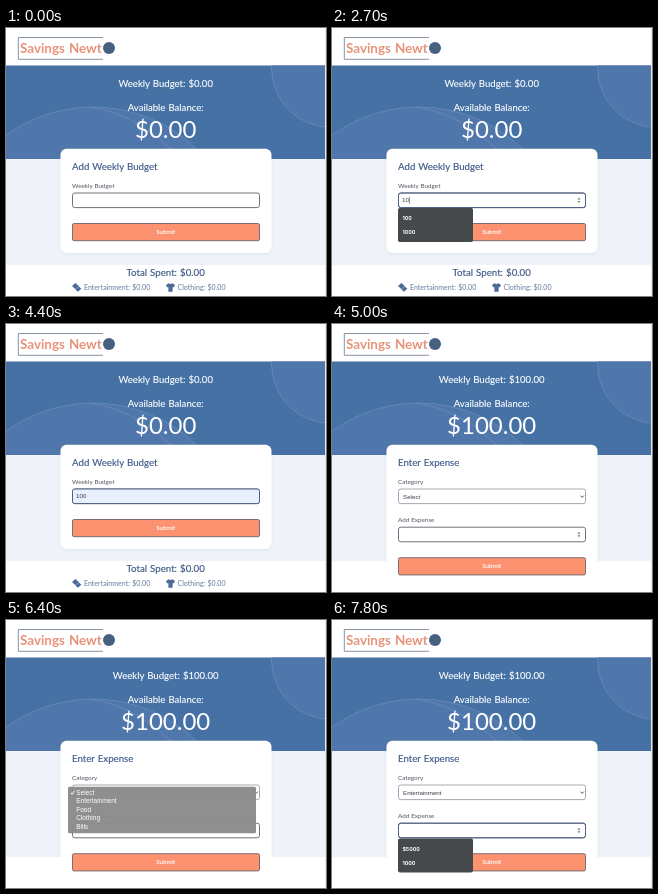
These frames come from a looping animation (320x268 px, 8000 ms). An HTML page:

```html
<!DOCTYPE html>
<html lang="en">
<head>
<meta charset="utf-8">
<title>Weekly budget demo</title>
<style>
  html, body { margin: 0; width: 100%; height: 100%; overflow: hidden; background: #fff; }
  svg { display: block; width: 100%; height: 100%; }
  text { font-family: Lato, "Open Sans", sans-serif; word-spacing: .06em; white-space: pre; }
  .mid { text-anchor: middle; }
  .brand { font-size: 13.4px; font-weight: 700; fill: #e8927a; }
  .line { font-size: 9.6px; fill: #fff; stroke: #fff; stroke-width: .12; }
  .balance { font-size: 24px; fill: #fff; }
  .heading { font-size: 9.7px; fill: #3d5988; stroke: #3d5988; stroke-width: .15; }
  .label { font-size: 6.3px; fill: #50555f; }
  .spent { font-size: 7.05px; fill: #637a9f; }
  .value { font: 6.2px "Liberation Sans", Arial, sans-serif; fill: #383c44; }
  .menu text { font: 6.5px "Liberation Sans", Arial, sans-serif; fill: #fff; }
  .list text { font: 700 5.3px Inter, sans-serif; fill: #fff; }
  .field { fill: #fff; stroke: #5f636c; stroke-width: .9; }
  .focus { fill: none; stroke: #4d6083; stroke-width: 1; }
  .caret { stroke: #666; stroke-width: .7; }
  .submit rect { fill: #fc9270; stroke: #6f6468; stroke-width: .9; }
  .submit text { font-size: 6.2px; fill: #fff; stroke: #fff; stroke-width: .1; }
</style>
</head>
<body>
<svg viewBox="0 0 320 268">
  <defs>
    <filter id="shadow" x="-10%" y="-10%" width="120%" height="120%">
      <feDropShadow dx="0" dy="1" stdDeviation="1.5" flood-color="#20406b" flood-opacity=".08"/>
    </filter>
    <clipPath id="banner"><rect y="37.5" width="320" height="93.5"/></clipPath>
    <rect id="box" x="66.5" y="165" width="187" height="14.6" rx="2.3"/>
    <path id="spinner" d="M245.4 171.5l1.5-2 1.5 2zM245.4 173l1.5 2 1.5-2z" fill="#737a86"/>
    <g id="submit" class="submit">
      <rect x="66.5" y="195.5" width="187" height="17.2" rx="1.6"/>
      <text class="mid" x="159.8" y="206.2">Submit</text>
    </g>
  </defs>

  <rect width="320" height="268" fill="#fff"/>
  <rect y="131" width="320" height="106" fill="#eff3f9"/>
  <g clip-path="url(#banner)">
    <rect y="37" width="320" height="94" fill="#4571a5"/>
    <g fill="#5077ab" stroke="#6c8fba" stroke-width=".7">
      <circle cx="87" cy="228" r="149"/>
      <circle cx="325" cy="40" r="59.5"/>
      <path d="M84 79Q134 86 174 131" fill="none"/>
    </g>
  </g>
  <rect x="319" width="1" height="268" fill="#e6e8ea"/>

  <path d="M97 9.5H12.3V31.3H97" fill="none" stroke="#76869a" stroke-width=".9"/>
  <text class="brand" x="14" y="25">Savings Newt</text>
  <circle cx="103" cy="20" r="6" fill="#46607f"/>

  <text class="line mid" x="159.7" y="58.7">Weekly Budget: <tspan class="amount"></tspan></text>
  <text class="line mid" x="159.7" y="82.6">Available Balance:</text>
  <text class="balance mid" x="159.7" y="109.6"><tspan class="amount"></tspan></text>

  <!-- Weekly budget form -->
  <g data-show="0-4500">
    <rect x="54.5" y="120.7" width="211" height="104.3" rx="6" fill="#fff" filter="url(#shadow)"/>
    <text class="heading" x="66" y="141.8">Add Weekly Budget</text>
    <text class="label" x="66" y="160.2">Weekly Budget</text>
    <use href="#box" class="field"/>
    <use href="#box" fill="#e8f0fe" data-show="3300-4500"/>
    <use href="#box" class="focus" data-show="1700-4500"/>
    <use href="#spinner" data-show="1700-3300"/>
    <text class="value" id="budget" x="70" y="174.4"></text>
    <path class="caret" id="caret" d="M0 168.7v7.2" data-show="1700-2200 2500-3300"/>
    <use href="#submit"/>
    <text class="heading mid" x="159.7" y="247.6">Total Spent: $0.00</text>
    <g fill="#4b6a96">
      <path d="M66 258l3.5-3 3.5 3.3-3.5 3z"/>
      <path d="M69.5 261.5l3.5-3 2.3 2.2-3.4 3z"/>
      <path d="M162.6 255.3q1.9 1.5 3.8 0l2.6 1.6-1.3 2.5-1.1-.5v4.9h-4.2v-4.9l-1.1.5-1.3-2.5z"/>
    </g>
    <text class="spent" x="78" y="262">Entertainment: $0.00</text>
    <text class="spent" x="171.5" y="262">Clothing: $0.00</text>
  </g>

  <!-- Expense form -->
  <g data-show="4500-8000">
    <rect x="54.5" y="120.7" width="211" height="143" rx="6" fill="#fff" filter="url(#shadow)"/>
    <rect x="50" y="237" width="220" height="31" fill="#fff"/>
    <text class="heading" x="66" y="141.8">Enter Expense</text>
    <text class="label" x="66" y="160.2">Category</text>
    <use href="#box" class="field" style="stroke:#9aa0a9"/>
    <path d="M248.6 171.6l1.6 1.8 1.6-1.8" fill="none" stroke="#444" stroke-width=".9"/>
    <text class="value" id="category" x="71" y="174.6"></text>
    <text class="label" x="66" y="198.4">Add Expense</text>
    <g transform="translate(0 38.2)">
      <use href="#box" class="field"/>
      <use href="#box" class="focus" data-show="7200-8000"/>
      <use href="#spinner" data-show="5000-5100 7200-8000"/>
      <path class="caret" d="M70.6 168.7v7.2" data-show="7200-7700"/>
      <use href="#submit"/>
    </g>
    <g id="menu" class="menu">
      <rect x="62" y="166.8" width="188" height="46.4" rx="1.5" fill="#8c8c8c" fill-opacity=".97"/>
      <rect id="highlight" x="62" width="188" height="9.2" fill="#55a3f8"/>
      <path d="M65 172.8l1.2 1.7 2.2-3.8" fill="none" stroke="#fff" stroke-width=".9"/>
    </g>
  </g>

  <g id="lists" class="list"></g>
</svg>

<script>
const LOOP = 8000;
const ns = 'http://www.w3.org/2000/svg';
const $ = id => document.getElementById(id);

function add(parent, tag, attributes, text = '') {
  const node = document.createElementNS(ns, tag);
  for (const [name, value] of Object.entries(attributes)) node.setAttribute(name, value);
  node.textContent = text;
  return parent.appendChild(node);
}

// Browser suggestion list below a field
function addList(show, top, items) {
  const list = add($('lists'), 'g', { 'data-show': show });
  add(list, 'rect', { x: 66, y: top, width: 75, height: 6 + 14 * items.length, rx: 1.8, fill: '#45494c' });
  items.forEach((item, i) => add(list, 'text', { x: 70.4, y: top + 12.3 + 14 * i }, item));
}
addList('1700-2500', 180, ['5', '200', '25', '100', '60', '50', '20']);
addList('2500-2700', 180, ['100', '1000', '10', '15', '150']);
addList('2700-3300', 180, ['100', '1000']);
addList('7200-8000', 218.4, ['$5000', '1000']);

['Select', 'Entertainment', 'Food', 'Clothing', 'Bills'].forEach((item, i) =>
  add($('menu'), 'text', { x: 70.2, y: 174.8 + 8.5 * i }, item));

const timed = [...document.querySelectorAll('[data-show]')].map(node => ({
  node,
  spans: node.dataset.show.split(' ').map(span => span.split('-').map(Number))
}));

// Latest value whose start time has passed
const at = (t, steps) => steps.filter(([start]) => t >= start).pop()[1];

function draw(t) {
  for (const { node, spans } of timed) {
    node.style.display = spans.some(([from, to]) => t >= from && t < to) ? '' : 'none';
  }
  const amount = t < 4500 ? '$0.00' : '$100.00';
  document.querySelectorAll('.amount').forEach(node => node.textContent = amount);

  const typed = at(t, [[0, ''], [2500, '1'], [2700, '10'], [2900, '100']]);
  $('budget').textContent = typed;
  $('caret').setAttribute('transform', `translate(${70.6 + typed.length * 3.4} 0)`);

  $('category').textContent = t < 6500 ? 'Select' : 'Entertainment';
  const fade = Math.min(1, Math.max(0, (6800 - t) / 250));
  $('menu').style.opacity = t < 5600 ? 0 : fade;
  const hovered = at(t, [[0, 0], [6000, 1], [6400, -1], [6500, 1]]);
  $('highlight').style.display = hovered < 0 ? 'none' : '';
  $('highlight').setAttribute('y', 167.8 + 8.5 * hovered);
}

const start = performance.now();
function frame() {
  draw((performance.now() - start) % LOOP);
  requestAnimationFrame(frame);
}
frame();
</script>
</body>
</html>
```
